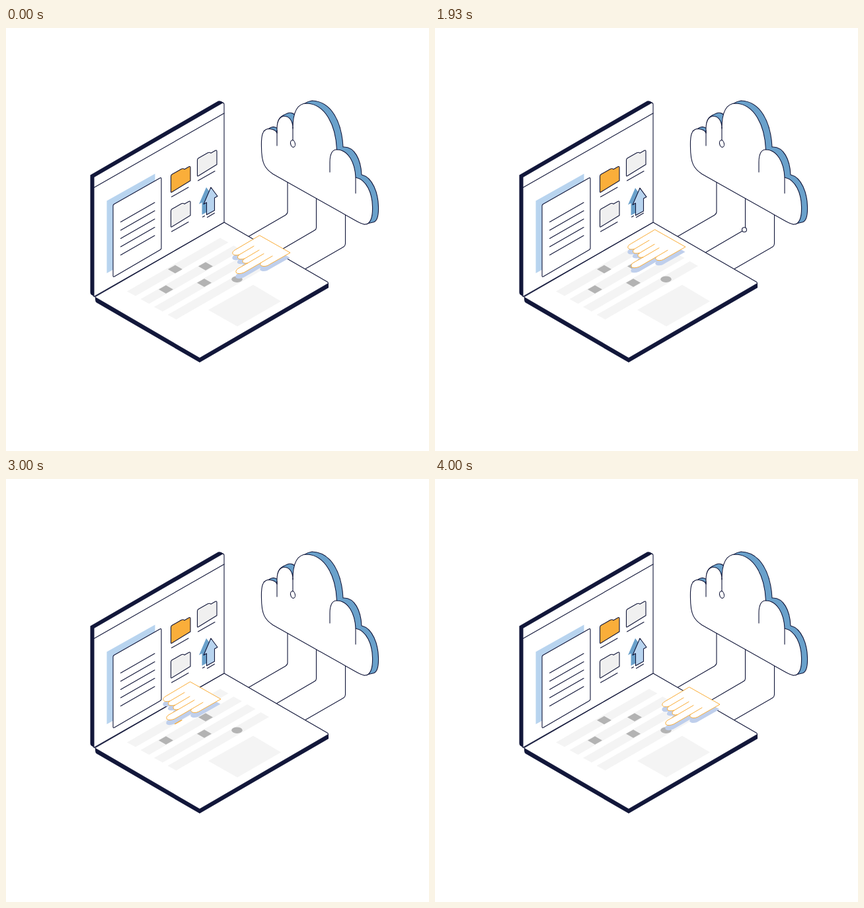
Animation of 640 by 640 pixels, one loop 4.28 s. Source, as an HTML page:

```html
<!DOCTYPE html>
<html lang="en">
<head>
<meta charset="utf-8">
<title>Laptop and cloud</title>
<style>
html, body { margin: 0; width: 100%; height: 100%; overflow: hidden; background: #fff; }
svg { display: block; width: 100vw; height: 100vh; }
.line { fill: none; stroke: #12173a; stroke-width: 1.1; stroke-linejoin: round; stroke-linecap: round; }
.white { fill: #fff; }
.pale { fill: #f4f4f4; }
.dark { fill: #12173a; }
.sky { fill: #b8d4ef; }
.blue { fill: #6aa1cb; }
.key { fill: #b3b3b3; }
</style>
</head>
<body>
<svg viewBox="0 0 640 640">
  <defs>
    <path id="folder" d="M249.500 248V224.500Q249.500 222.500 251 221.500L265 213.500Q268 211.800 270 213.800L277 209.800Q279 209 279 211V231L251 248.300Q249.500 249 249.500 248Z"/>
    <path id="caption" d="M250.500 255.500L276 241"/>
    <path id="row" d="M324 317.500L336.500 324.500L196 405.500L183 398.500Z"/>
    <path id="diamond" d="M-11 0L0 -6.300L11 0L0 6.300Z"/>
    <path id="arrow" d="M310 241L320 254.500L315.500 257V276L303.500 282.500V264L299 266.500Z"/>
    <path id="palm" d="M384 314L430 340L400 357Q393 362 387 360Q383 358 386 355L360 370Q352 373 348.500 370.500Q346.500 367 351 364L366 355.500Q360 357 358 354Q357 351 361 349Q353 351 350.500 348Q350 345 353 343Q345 345 343 341.500Q342 338 347 335.500Z"/>
  </defs>

  <!-- cloud and wires -->
  <g class="line">
    <path d="M426 233V278Q426 281 423 283L366 316"/>
    <path id="wire" d="M469.500 258V302Q469.500 304.500 467 306L407 341"/>
    <path d="M513.500 283V326Q513.500 329 511 331L452 365"/>
    <path class="blue" d="M390 156L398 152C402 149 407 149 411 152V146C411 137 416 133 426 129C431 127 437 130 438 133L440 125C445 117 455 111 463 110C493 111 508 143 510 180C528 179 537 200 538 222C555 226 563 250 563.500 270C564 284 561 293 555 294L542 297Z"/>
    <path class="white" d="M386.500 180C386 162 388 153 398 152.500C405 153 409 156 410 159V152C410 141 414 133 422 133.500C430 134 434 142 434 152C434 128 440 114 455 114C483 115 499 147 500.500 184C518 184 528 204 529 226C546 230 554 250 554.500 270C555 285 552 298 542 297Q537 296 530 292L404 221C392 213 386.500 205 386.500 180Z"/>
    <path d="M410 155V178M434 150V170M490 218V203C490 190 494 183.500 501 184M529 226V250"/>
    <ellipse class="white" cx="434" cy="175" rx="3.400" ry="5.400" transform="rotate(-12 434 175)"/>
    <circle id="ball" class="white" r="3.500"/>
  </g>

  <!-- laptop base -->
  <path class="dark" d="M135 407L293 499L488 386V393L293 506L137 415.500Q135 414 135 411Z"/>
  <path class="white line" d="M330 294L486 384Q489 386 486 387.500L293 499.500L135 407.500V406.500Z"/>
  <g class="pale">
    <use href="#row"/>
    <use href="#row" x="20.500" y="11.800"/>
    <use href="#row" x="41" y="23.600"/>
    <use href="#row" x="61.500" y="35.400"/>
    <path d="M374 388.500L416 413.500L350 451.500L306 426.500Z"/>
  </g>
  <ellipse class="key" cx="349.500" cy="380.200" rx="8.200" ry="4.800"/>
  <use class="key" href="#diamond" x="300" y="385.500"/>
  <use class="key" href="#diamond" x="256" y="365"/>
  <use class="key" href="#diamond" x="242" y="395.500"/>
  <use class="key" href="#diamond" x="302" y="360.500"/>

  <!-- screen -->
  <path class="dark" d="M127.500 222.500L321 110.500Q324 109 330 113.500V118L133 230V406L129 403.500Q127.500 402 127.500 400Z"/>
  <path class="white line" d="M133 225.500L327 113.500Q330 112.500 330 116V294L133 406.500Z"/>
  <path class="line" d="M133 241.500L330 129"/>
  <path class="sky" d="M152.500 261.500L225.500 220.500V330L152.500 371Z"/>
  <path class="white line" d="M162 269Q162 267.500 163.500 266.500L233 227Q235 226 235 228V333Q235 334.500 233.500 335.500L164 376Q162 377 162 375Z"/>
  <g class="line">
    <path d="M173.500 293.500L225 264M173.500 306L225 276.500M173.500 318.500L225 289M173.500 331L225 301.500M173.500 343.500L225 314"/>
    <use href="#folder" fill="#faae3a"/>
    <use href="#folder" x="40" y="-24.500" fill="#f0f0f0"/>
    <use href="#folder" y="52.500" fill="#f0f0f0"/>
    <use href="#caption"/>
    <use href="#caption" x="40" y="-24.500"/>
    <use href="#caption" y="52.500"/>
    <path d="M297.500 286L300.500 284.300M304.500 286.500L315.500 280"/>
  </g>
  <g id="upload">
    <use href="#arrow" class="blue" x="-7"/>
    <use href="#arrow" class="sky line" style="fill:#b8d4ef"/>
  </g>

  <!-- hand -->
  <g id="hand">
    <use href="#palm" x="-0.500" y="7.500" fill="#bfcfec"/>
    <g stroke="#faae3a" stroke-linejoin="round" stroke-linecap="round">
      <use href="#palm" fill="#fff"/>
      <path fill="none" d="M353 343L375 330M361 349L383 336M366 355.500L390 341.500M386 355L403 345"/>
    </g>
  </g>
</svg>
<script>
const LOOP = 4280, FPS = 14;
const $ = id => document.getElementById(id);
const hand = $('hand'), upload = $('upload'), ball = $('ball'), wire = $('wire');
const keys = [...document.querySelectorAll('.key')];
const flashes = [14, 32, 39, 46];

// step, x, y
const poses = [
  [15, 0, 0], [18, -24, -13], [22, -48, -18], [26, -51, -12], [31, -51, 6],
  [33, -51, 6], [36, -76, -14], [38, -92, -17], [42, -105, -7], [46, -111, 16],
  [48, -112, 17], [51, -55, 8], [54, -12, 2], [56, 1, 1]
];

const rise = (i, c) => (poses[i + 1][c] - poses[i][c]) / (poses[i + 1][0] - poses[i][0]);

// zero at turning points, so the curve never overshoots
function slope(i, c) {
  if (i === 0 || i === poses.length - 1) return 0;
  const a = rise(i - 1, c), b = rise(i, c);
  return a * b > 0 ? 2 * a * b / (a + b) : 0;
}

function pose(step, c) {
  const last = poses.length - 1;
  if (step <= poses[0][0]) return poses[0][c];
  if (step >= poses[last][0]) return poses[last][c];
  const i = poses.findIndex(p => p[0] > step) - 1;
  const span = poses[i + 1][0] - poses[i][0], u = (step - poses[i][0]) / span;
  const ease = u * u * (3 - 2 * u);
  return poses[i][c] * (1 - ease) + poses[i + 1][c] * ease
    + span * u * (1 - u) * ((1 - u) * slope(i, c) - u * slope(i + 1, c));
}

function draw(now) {
  const step = Math.floor((now % LOOP + 5) * FPS / 1000);
  hand.setAttribute('transform', `translate(${pose(step, 1)} ${pose(step, 2)})`);

  const bounce = step > 15 && step < 30 ? 1.8 * Math.sin((step - 15) / 15 * Math.PI) : 0;
  upload.setAttribute('transform', `translate(0 ${bounce})`);

  flashes.forEach((start, i) => {
    const glow = Math.max(0, Math.min(1, (step - start) * .35, (start + 7 - step) * .35));
    keys[i].style.fill = `color-mix(in srgb, #faae3a ${glow * 100}%, #b3b3b3)`;
  });

  const run = 24 + (step - 22) * 4.75;
  const spot = wire.getPointAtLength(Math.max(0, run));
  ball.setAttribute('cx', spot.x);
  ball.setAttribute('cy', spot.y);
  ball.style.display = run > 0 && run < 114 ? '' : 'none';

  requestAnimationFrame(draw);
}
requestAnimationFrame(draw);
</script>
</body>
</html>
```
